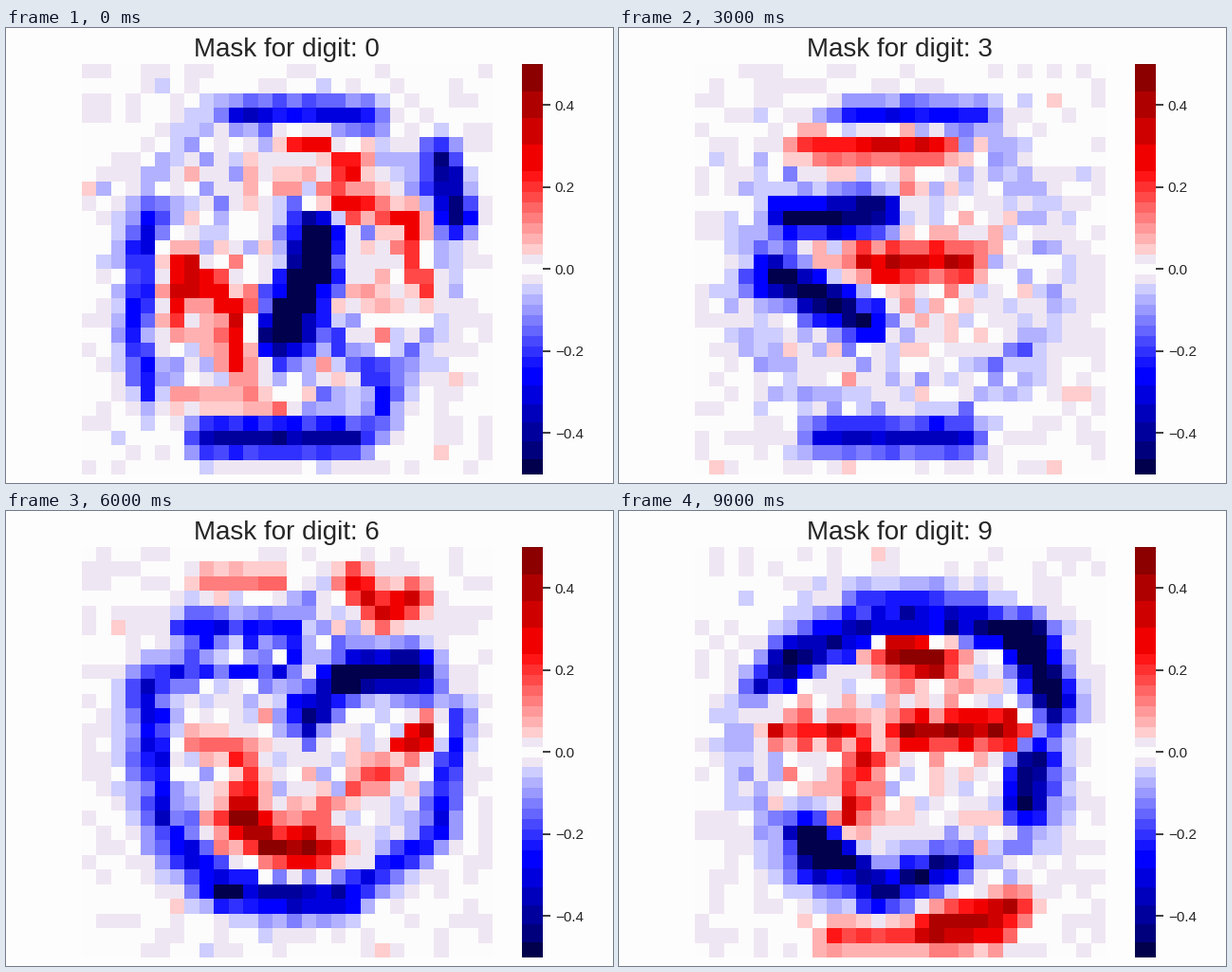
A matplotlib script that plays this animation: 640 px wide and 480 px high, repeating every 10000 ms.

```python
import numpy as np
import matplotlib.pyplot as plt
from matplotlib.animation import FuncAnimation
from matplotlib.colors import ListedColormap

W, H, N = 640, 480, 28
INK, PAPER = "#262626", "#fdfdfd"
plt.rcParams["font.family"] = "Liberation Sans"

seismic = plt.get_cmap("seismic")
ROW, COL = np.mgrid[0:N, 0:N]
RADIUS = np.hypot(COL - 13.5, ROW - 13.5)


def shade(v):
    """Stepped version of the seismic map for v in -0.5..0.5."""
    a = abs(v)
    if a < 0.014:
        return (0.992, 0.992, 0.992, 1)
    if a < 0.036:
        return (0.941, 0.902, 0.953, 1)
    if a < 0.24:
        mid = 0.036 + (int((a - 0.036) / 0.0255) + 0.5) * 0.0255
    elif v > 0:
        mid = 0.25 + (int((a - 0.24) / 0.065) + 0.4) * 0.065
    else:
        mid = 0.5 if a > 0.464 else 0.25 + int((a - 0.24) / 0.045) * 0.045
    return seismic(0.5 + np.sign(v) * min(mid, 0.5))


CMAP = ListedColormap([shade(v) for v in np.linspace(-0.5, 0.5, 1001)])


def stroke(weight, *xy):
    """Soft line through (column, row) points; strong lines are wider."""
    points = list(zip(xy[::2], xy[1::2]))
    best = np.full((N, N), np.inf)
    for (x0, y0), (x1, y1) in zip(points, points[1:]):
        dx, dy = x1 - x0, y1 - y0
        t = np.clip(((COL - x0) * dx + (ROW - y0) * dy) / (dx * dx + dy * dy), 0, 1)
        best = np.minimum(best, np.hypot(COL - x0 - t * dx, ROW - y0 - t * dy))
    return weight * np.exp(-(best / (0.75 + 1.2 * abs(weight))) ** 2)


def mask(digit, top, bottom, *strokes):
    """Bars above and below, the strokes between them, a rim and some noise."""
    rng = np.random.default_rng(40 + digit)
    spread = 0.016 + 0.035 / (1 + np.exp(1.5 * (RADIUS - 10.5)))
    field = rng.normal(0, spread)
    field -= 0.06 * np.exp(-((RADIUS - 10.7) / 1.6) ** 2)
    field += stroke(top, 10, 3, 19, 3) + stroke(bottom, 8, 25, 18, 25)
    field += sum(stroke(*s) for s in strokes)
    return np.clip(field, -0.499, 0.499)


MASKS = [
    mask(0, -0.24, -0.36,
         (-0.65, 15.5, 11, 15, 14, 13, 18), (-0.4, 24, 6, 25, 10),
         (0.26, 18, 6, 17, 9, 22, 10), (0.22, 22, 12, 23, 15),
         (0.3, 7, 14, 10, 16, 10, 20), (0.2, 6, 13, 6, 17),
         (0.16, 6, 22, 13, 23), (-0.2, 4, 10, 3, 18, 4, 22),
         (-0.18, 15, 18, 20, 20, 20, 24), (0.22, 14, 5, 16, 5)),
    mask(1, -0.25, -0.3,
         (0.36, 15, 6, 14, 13, 12, 21), (-0.4, 18, 9, 17, 17),
         (-0.35, 10, 7, 9, 17), (-0.25, 23, 16, 21, 20)),
    mask(2, 0.06, -0.4,
         (-0.25, 14, 2, 20, 2, 23, 5, 24, 9), (0.3, 9, 4, 12, 5, 17, 5),
         (-0.65, 7, 11, 15, 11), (-0.5, 5, 14, 9, 12.5),
         (0.32, 6, 17, 12, 17), (0.23, 8, 14, 12, 16),
         (0.18, 5, 20, 11, 20), (-0.25, 20, 14, 23, 14, 23, 11),
         (0.4, 25, 14, 25, 17, 23, 21), (0.28, 18, 22, 23, 22)),
    mask(3, -0.2, -0.3,
         (0.3, 7, 5, 16, 5), (-0.5, 6, 10, 12, 9.6),
         (0.36, 11, 13, 18, 13), (-0.5, 5, 14, 11, 17)),
    mask(4, -0.4, -0.48,
         (-0.25, 7, 3, 11, 4, 11, 8), (-0.6, 15.5, 6, 13.5, 10, 14, 13),
         (0.42, 22, 5, 23, 7), (0.34, 5, 14, 10, 14),
         (0.4, 10, 12, 11, 13), (0.35, 16, 11, 17, 14, 20, 14),
         (0.35, 14, 17, 17, 16, 21, 16), (0.32, 7, 15, 8, 17),
         (-0.5, 11, 18, 7, 20), (-0.3, 6, 22, 13, 20, 22, 19, 24, 11),
         (0.24, 16, 23, 20, 22)),
    mask(5, -0.25, -0.05,
         (-0.3, 9, 4, 6, 6, 4, 9), (0.3, 8, 9, 11, 10, 11, 13),
         (0.48, 23, 6, 24, 9), (0.25, 19, 8, 22, 6),
         (-0.5, 14, 9, 20, 11), (-0.6, 20, 11, 23.5, 11.5, 23, 14),
         (-0.5, 6, 15, 10, 17.4, 12, 17.4), (-0.22, 15, 12, 15, 16),
         (0.25, 6, 18, 11, 20), (0.28, 21, 21, 23, 20),
         (0.13, 9, 22, 22, 22)),
    mask(6, 0, 0,
         (0.17, 8, 2, 13, 2), (0.33, 18, 2, 20, 4, 22, 3),
         (-0.22, 7, 5, 14, 5, 14, 8, 6, 8), (-0.55, 18, 8, 22, 8),
         (-0.45, 17, 9, 15, 11), (-0.27, 4, 9, 5, 18, 9, 23),
         (-0.33, 10, 23, 17, 23.5), (-0.2, 18, 23, 24, 19, 25, 11),
         (0.2, 7, 13, 10, 13, 11, 17), (0.4, 10, 18, 13, 20, 16, 20),
         (0.38, 22, 13, 23, 12), (0.16, 15, 18, 20, 15)),
    mask(7, -0.06, 0.15,
         (-0.42, 11, 5, 21, 5), (0.24, 3, 12, 4, 9, 12, 7.5),
         (0.4, 12, 9, 17, 10), (0.25, 17, 9, 21, 10),
         (-0.6, 13.5, 12, 12, 15, 10, 17), (-0.22, 7, 14, 9, 14),
         (0.36, 17, 15, 20, 15), (-0.42, 6, 20, 9, 18),
         (-0.5, 17, 21, 21, 20), (-0.2, 10, 22, 19, 23),
         (0.25, 4, 25, 7, 24)),
    mask(8, -0.2, -0.25,
         (0.28, 11, 6, 17, 5), (-0.4, 6, 7, 6, 12),
         (0.36, 10, 8, 16, 14), (-0.38, 21, 11, 22, 15)),
    mask(9, -0.1, 0,
         (-0.4, 6, 7, 9, 6, 14, 4.5, 22, 5.5), (-0.52, 22.5, 6, 24, 10),
         (0.52, 13, 6.5, 16, 7), (-0.25, 4, 9, 6, 8),
         (0.26, 5, 12, 10, 12), (0.42, 14, 12, 21, 12),
         (0.28, 11, 14, 10, 18), (-0.5, 22.5, 14, 22, 17),
         (-0.5, 7, 19, 8, 21), (-0.4, 9, 20, 12, 23, 17, 21),
         (0.38, 16, 25, 21, 24), (0.22, 9, 26, 20, 26)),
]

fig = plt.figure(figsize=(W / 100, H / 100), dpi=100, facecolor=PAPER)


def pixel_axes(x, y, w, h):
    return fig.add_axes([x / W, 1 - (y + h) / H, w / W, h / H])


ax = pixel_axes(80, 38, 432.6, 432.6)
ax.axis("off")
image = ax.imshow(MASKS[0], cmap=CMAP, vmin=-0.5, vmax=0.5,
                  interpolation="nearest", aspect="auto")
title = ax.set_title("", fontsize=20, color=INK, pad=6)

bar = pixel_axes(544, 38, 21.6, 432.6)
bar.imshow(np.linspace(-0.5, 0.5, 433)[:, None], cmap=CMAP, origin="lower",
           vmin=-0.5, vmax=0.5, aspect="auto", interpolation="nearest",
           extent=(0, 1, -0.5, 0.5))
bar.spines[:].set_visible(False)
bar.set_xticks([])
bar.yaxis.tick_right()
bar.set_yticks(np.arange(-2, 3) / 5)
bar.yaxis.set_major_formatter(lambda v, _: f"{v:.1f}".replace("-", "\u2212"))
bar.tick_params(axis="y", length=6, width=1.25, pad=3.5,
                color=INK, labelcolor=INK, labelsize=11)


def update(digit):
    image.set_data(MASKS[digit])
    title.set_text(f"Mask for digit: {digit}")
    return image, title


anim = FuncAnimation(fig, update, frames=10, interval=1000, repeat=True)
plt.show()
```
